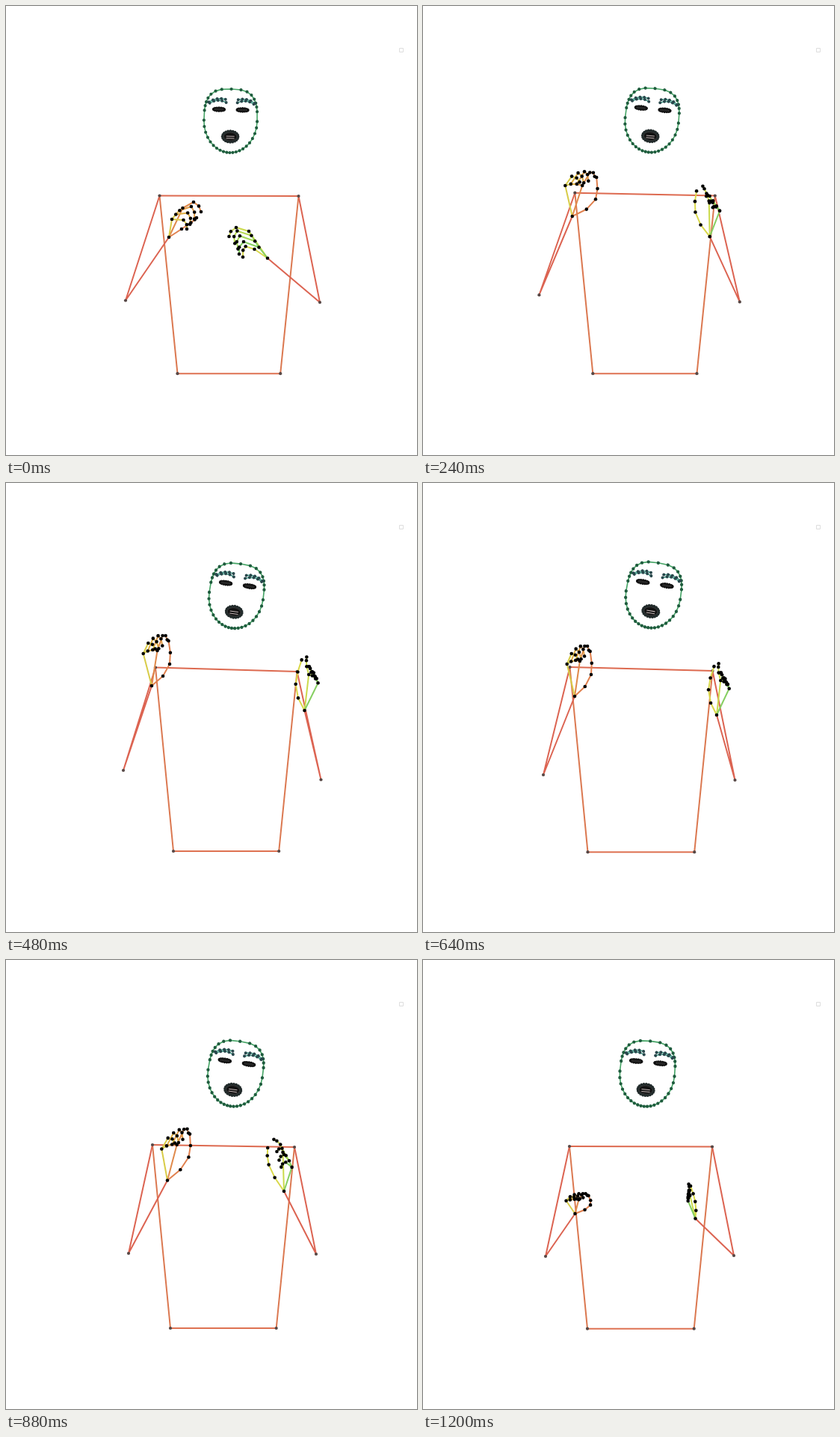
Write an HTML page with a canvas that moves like this. It is 550 by 600 pixels and loops after 1280 ms.

```html
<!DOCTYPE html>
<html lang="en">
<head>
<meta charset="utf-8">
<title>Pose skeleton</title>
<style>
html, body { margin: 0; height: 100%; overflow: hidden; background: #fff; }
canvas { display: block; }
</style>
</head>
<body>
<canvas id="stage" width="550" height="600"></canvas>
<script>
const ctx = document.getElementById('stage').getContext('2d');
const STEP = 80, STEPS = 16;

// Hand shapes relative to the wrist: thumb base and tip,
// then base, knuckle and tip of the index and of the little finger.
const leftFold = [17,-11, 37,-26, 18.5,-39, 33,-47, 43,-34, 4,-24, 19.5,-23, 24,-11];
const leftUp = [16,-13, 24,-60, 8,-47, 15.5,-67, 22,-61.5, -12,-43, -5,-57, 5,-49.5];
const rightFold = [-17.5,-12, -33,-1.5, -25,-36, -42,-41, -51.5,-29, -11.5,-14.5, -32,-22, -38,-5.5];
const rightTurn = [-15.5,-14, -31.5,-47, -10,-45, -15,-53.5, -25,-58, 5.5,-29.5, -4,-34, -9,-27.5];
const rightUp = [-9,-17, -4,-69, 6,-49, 3,-60, 3,-73, 19,-37.5, 17,-43.5, 13.5,-47.5];

// Places a shape at wrist (x, y) under the matrix [a b; c d].
function hand(shape, x, y, a = 1, b = 0, c = 0, d = 1) {
  const out = [x, y];
  for (let i = 0; i < shape.length; i += 2) {
    const dx = shape[i], dy = shape[i + 1];
    out.push(x + a * dx + b * dy, y + c * dx + d * dy);
  }
  return out;
}

// Body: both shoulders, both elbows, hip height. Face: centre, tilt in degrees, scale.
const key = (step, body, face, left, right) => ({ step, v: [...body, ...face, ...left, ...right] });
const keys = [
  key(0, [205.5,253.5, 391.5,254, 160,393.5, 420,396, 491.2], [300.5, 153.5, 1.5, 1],
    hand(leftFold, 218, 309), hand(rightFold, 350, 337)),
  key(2, [205,252, 391.5,254, 156.5,390.5, 423,395.5, 491], [305, 153.5, 4.5, 1],
    hand(leftUp, 209, 298, 1.18, -0.2, 0.25, 0.8), hand(rightTurn, 368.5, 321)),
  key(4, [201.5,247.5, 390,253, 155,382.5, 424,395.5, 491.5], [307, 152, 7, 1.015],
    hand(leftUp, 192, 266), hand(rightUp, 397, 298)),
  key(6, [200,246.5, 389.5,252, 157,384, 421.5,396.5, 492], [308, 151, 8, 1.02],
    hand(leftUp, 195, 271, 0.94), hand(rightUp, 399.5, 304, 0.95, 0, 0, 0.98)),
  key(8, [196.5,246, 387.5,251, 161,390, 417.5,397, 493.2], [308, 150, 9, 1.03],
    hand(leftUp, 203, 285, 0.86), hand(rightUp, 393, 310, 0.88, 0, 0, 0.94)),
  key(11, [196,247, 386,250, 164,392, 415,393, 492], [306.7, 152, 8.5, 1.03],
    hand(leftUp, 216, 294.5, 1, -0.1, -0.08), hand(rightTurn, 372, 309, 0.96, -0.18, 0.17, 1.12)),
  key(15, [196,249, 387,249.5, 164,396, 416,395, 492.7], [300, 152, 5.5, 1.03],
    hand(leftUp, 203.5, 339, 0.85, 0.04, 0, 0.4), hand(rightUp, 364.5, 345.5, -0.3, 0.11, 0, 0.63))
];

function slope(k, i) {
  const a = keys[Math.max(k - 1, 0)], b = keys[Math.min(k + 1, keys.length - 1)];
  return (b.v[i] - a.v[i]) / (b.step - a.step);
}

// Smooth Hermite curve through the key poses.
function poseAt(step) {
  let k = 0;
  while (k < keys.length - 2 && step >= keys[k + 1].step) k++;
  const p = keys[k], q = keys[k + 1], w = q.step - p.step, u = (step - p.step) / w;
  const h = u * u * (3 - 2 * u);
  return p.v.map((a, i) => a + (q.v[i] - a) * h
    + w * u * (1 - u) * ((1 - u) * slope(k, i) - u * slope(k + 1, i)));
}

const range = (n, f) => Array.from({ length: n }, (_, i) => f(i));
const pairs = list => range(list.length / 2, i => [list[2 * i], list[2 * i + 1]]);
const mix = (p, q, t) => [p[0] + (q[0] - p[0]) * t, p[1] + (q[1] - p[1]) * t];
const mirror = (points, axis) => points.map(([x, y]) => [2 * axis - x, y]);

function line(points, color, width = 2, closed = false) {
  ctx.beginPath();
  points.forEach(p => ctx.lineTo(p[0], p[1]));
  if (closed) ctx.closePath();
  ctx.strokeStyle = color;
  ctx.lineWidth = width;
  ctx.stroke();
}

function dots(points, color, r) {
  ctx.fillStyle = color;
  for (const [x, y] of points) {
    ctx.beginPath();
    ctx.arc(x, y, r, 0, 7);
    ctx.fill();
  }
}

function oval(x, y, rx, ry, color) {
  ctx.fillStyle = color;
  ctx.beginPath();
  ctx.ellipse(x, y, rx, ry, 0, 0, 7);
  ctx.fill();
}

const ring = (x, y, rx, ry, n) => range(n, i => {
  const a = i / n * 2 * Math.PI;
  return [x + rx * Math.cos(a), y + ry * Math.sin(a)];
});

// Half an outline: squarish forehead down to the temple, then a round jaw.
const cheek = range(19, i => {
  const top = i < 8, u = top ? i / 8 : (i - 8) / 10;
  const turn = top ? u + 0.1 * Math.sin(Math.PI * u) ** 2 : 1 + u * (1.3 - 0.3 * u);
  const a = turn * Math.PI / 2, power = top ? 2 / 3 : 1;
  return [35.6 * Math.abs(Math.sin(a)) ** power,
    -42.5 * Math.sign(Math.cos(a)) * Math.abs(Math.cos(a)) ** power];
});
const outline = cheek.concat(mirror(cheek.slice(1, -1), 0).reverse());
const browTop = range(5, i => [9.5 + 5.6 * i, -29.5 + 0.65 * (i - 1.2) ** 2]);
const browLow = range(5, i => [8.5 + 5.5 * i, -27 + 0.8 * (i - 1.8) ** 2]);

function drawEye(x, y) {
  oval(x, y, 8, 2.8, '#111');
  dots(ring(x, y, 7.5, 2.2, 16), '#111', 1.6);
  for (let i = -5; i <= 5; i += 2) line([[x + i, y - 1.3], [x + i, y + 1.3]], '#666', 0.5);
}

function drawMouth(x, y) {
  oval(x, y, 11, 8, '#111');
  dots(ring(x, y, 10.4, 7.4, 20), '#222b2b', 1.9);
  line(ring(x, y, 8.8, 5.4, 20), '#4a4a4a', 0.6, true);
  for (const dy of [-0.4, 2.4]) line([[x - 5.5, y + dy], [x + 5.5, y + dy]], '#c4b6b6', 1);
}

function drawFace([x, y, tilt, scale]) {
  ctx.save();
  ctx.translate(x, y);
  ctx.rotate(tilt * Math.PI / 180);
  ctx.scale(scale, scale);
  line(outline, '#46a566', 1.6, true);
  dots(outline, '#1f5c3e', 2.1);
  for (const row of [browTop, browLow]) {
    for (const brow of [row, mirror(row, 1)]) {
      line(brow, '#3f9f8a', 1.5);
      dots(brow, '#29484c', 2);
    }
  }
  drawEye(-15.9, -15);
  drawEye(15.7, -15);
  drawMouth(0.2, 21);
  ctx.restore();
}

const warm = ['#e0804e', '#e08a4c', '#e09c48', '#dfb045', '#d8cc48'];
const fresh = ['#d9d84a', '#cbda4c', '#b6da50', '#a2d856', '#86cf62'];

// The thumb bends away from the line wrist to thumb base.
function thumbJoints(wrist, base, tip) {
  const bend = mix(wrist, base, 2);
  return [0, 0.45, 0.75, 1].map(u => mix(mix(base, bend, u), mix(bend, tip, u), u));
}

// Four fingers fan out from index to little finger; the inner two arch away from the wrist.
function fingerJoints(wrist, index, little, t) {
  const arch = t * (1 - t) * 4.5;
  const [base, knuckle, tip] = [0.05, 0.05, -0.07].map((lift, j) =>
    mix(wrist, mix(index[j], little[j], t), 1 + lift * arch));
  const half = mix(knuckle, tip, 0.5);
  const joint = half.map((c, i) => c + 0.14 * (knuckle[i] - base[i]));
  return [base, knuckle, joint, tip];
}

function drawHand([wrist, base, tip, ...rest], colors) {
  const fingers = [thumbJoints(wrist, base, tip),
    ...range(4, i => fingerJoints(wrist, rest.slice(0, 3), rest.slice(3), i / 3))];
  fingers.forEach((finger, i) => {
    const color = colors[i];
    line(finger, color);
    if (i < 2 || i === 4) line([wrist, finger[0]], color);
    if (i > 1) line([fingers[i - 1][0], finger[0]], color);
  });
  dots([wrist, ...fingers.flat()], '#000', 2.3);
}

function drawBody([ls, rs, le, re], hipY, lw, rw) {
  const lh = [ls[0] + 24, hipY], rh = [rs[0] - 24.3, hipY];
  line([ls, lh], '#db7850');
  line([rs, rh], '#db7850');
  line([lh, rh], '#de7252');
  line([ls, rs], '#dd6a50');
  line([ls, le, lw], '#dc6452');
  line([rs, re, rw], '#dc6452');
  dots([ls, rs, le, re, lh, rh], '#574846', 2.1);
}

function draw(step) {
  const v = poseAt(step);
  const left = pairs(v.slice(13, 31)), right = pairs(v.slice(31));
  ctx.fillStyle = '#fff';
  ctx.fillRect(0, 0, 550, 600);
  ctx.lineJoin = 'round';
  ctx.strokeStyle = '#ddd';
  ctx.lineWidth = 1;
  ctx.strokeRect(526.5, 56.5, 5, 5);
  drawBody(pairs(v.slice(0, 8)), v[8], left[0], right[0]);
  drawFace(v.slice(9, 13));
  drawHand(left, warm);
  drawHand(right, fresh);
}

const start = performance.now();
function tick() {
  draw(Math.floor((performance.now() - start) / STEP) % STEPS);
  requestAnimationFrame(tick);
}
tick();
</script>
</body>
</html>
```
